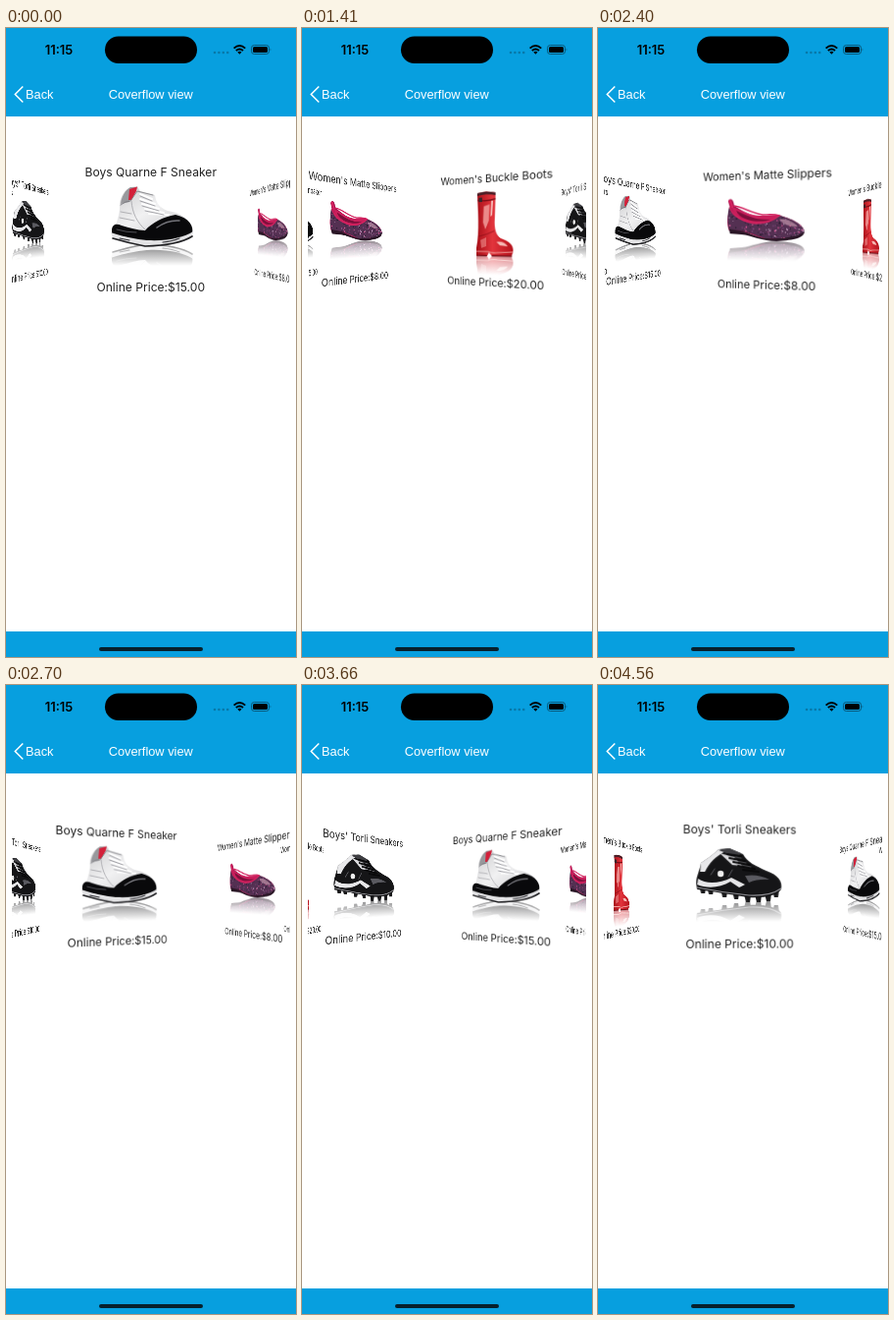
An HTML page that plays this animation: 296x640 px, repeating every 4660 ms.

```html
<!DOCTYPE html>
<html lang="en">
<head>
<meta charset="utf-8">
<title>Coverflow view</title>
<style>
html, body { margin: 0; width: 100%; height: 100%; overflow: hidden; background: #fff; }
#stage { position: absolute; left: 0; top: 0; width: 296px; height: 640px; overflow: hidden; background: #fff; }
#stage svg { position: absolute; left: 0; top: 0; }
#view { position: absolute; left: 6px; top: 90px; width: 284px; height: 524px; overflow: hidden; }
#view svg { left: -6px; top: -90px; transform-origin: 147.75px 213px; }
.label { font: 12.1px Inter, sans-serif; fill: #222; text-anchor: middle; }
.nav { font: 12.8px "Liberation Sans", sans-serif; fill: #fff; }
.clock { font: 600 13px Inter, sans-serif; text-anchor: middle; }
</style>
</head>
<body>
<div id="stage">
  <svg width="296" height="640" viewBox="0 0 296 640">
    <defs>
      <linearGradient id="fade" gradientUnits="userSpaceOnUse" x1="0" y1="217" x2="0" y2="238">
        <stop offset="0" stop-color="#fff" stop-opacity=".5"/>
        <stop offset="1" stop-color="#fff" stop-opacity="0"/>
      </linearGradient>
      <mask id="mirror" maskUnits="userSpaceOnUse" x="90" y="205" width="116" height="45">
        <rect x="90" y="205" width="116" height="45" fill="url(#fade)"/>
      </mask>
      <linearGradient id="leather" x1="0" y1="0" x2="1" y2="1">
        <stop offset="0" stop-color="#c9c9cb"/>
        <stop offset=".45" stop-color="#f1f1f2"/>
        <stop offset="1" stop-color="#c4c4c7"/>
      </linearGradient>
      <linearGradient id="rubber" x1="0" y1="0" x2="1" y2="0">
        <stop offset="0" stop-color="#a80f18"/>
        <stop offset=".45" stop-color="#e2343c"/>
        <stop offset="1" stop-color="#b5121c"/>
      </linearGradient>
      <clipPath id="vamp">
        <path d="M108 180C111 190 122 196 136 198C150 199 158 194 163 190C174 193 188 199 189 207C188 214 166 215 148 214C138 211 130 207 121 206L108 205C106 198 106 188 108 180Z"/>
      </clipPath>
    </defs>
    <rect width="296" height="90" fill="#079fdf"/>
    <rect y="614" width="296" height="26" fill="#079fdf"/>
    <rect x="95" y="630" width="106" height="4" rx="2" fill="#07202c"/>
    <rect x="101" y="8.5" width="94" height="27.5" rx="13.7"/>
    <text class="clock" x="54" y="26.7">11:15</text>
    <g fill="#0878a8">
      <circle cx="213" cy="25" r="1.3"/><circle cx="217.4" cy="25" r="1.3"/>
      <circle cx="221.8" cy="25" r="1.3"/><circle cx="226.2" cy="25" r="1.3"/>
    </g>
    <g fill="none" stroke="#000" stroke-width="1.9">
      <path d="M232.6 20.6Q238.4 15.4 244.2 20.6M234.8 23Q238.4 19.9 242 23"/>
    </g>
    <path d="M236.3 24.6Q238.4 22.9 240.5 24.6L238.4 26.8Z"/>
    <rect x="250.5" y="17.5" width="18" height="9" rx="2.8" fill="none" stroke="#07587a"/>
    <rect x="252" y="19" width="15" height="6" rx="1.6"/>
    <path d="M269.7 20.5Q271.2 22 269.7 23.5Z" fill="#07587a"/>
    <path d="M17.3 59.5L9.3 67.5L17.3 75.5" fill="none" stroke="#fff" stroke-width="1.5"/>
    <text class="nav" x="20" y="72">Back</text>
    <text class="nav" x="147.75" y="72" text-anchor="middle">Coverflow view</text>
  </svg>
  <div id="view"></div>
</div>
<script>
const LOOP = 4660, WIDTH = 230, DEPTH = 376, TILT = 0.9, SPACING = 0.25;

// small seeded generator for the glitter
let seed = 7;
const rand = () => (seed = seed * 16807 % 2147483647) / 2147483647;

function glitter(count) {
  const tones = ['#e85a9c', '#241a2c', '#8a4c86', '#c9a3c4', '#31203a'];
  let s = '';
  for (let i = 0; i < count; i++) {
    const x = (106 + rand() * 84).toFixed(1), y = (182 + rand() * 33).toFixed(1);
    s += `<circle cx="${x}" cy="${y}" r="${(0.4 + rand() * 0.5).toFixed(2)}" fill="${tones[i % 5]}"/>`;
  }
  return s;
}

const path = (d, fill) => `<path d="${d}" fill="${fill}"/>`;
const line = (d, color, w) => `<path d="${d}" fill="none" stroke="${color}" stroke-width="${w}" stroke-linecap="round"/>`;

const hightop =
  path('M111 207C112 197 117 190 116 179C117 171 121 165 127 162L134 161L137 166L152 170C153 178 157 183 165 186C178 188 188 194 190 205L150 214Z', 'url(#leather)') +
  path('M117 179C118 171 122 165 127 162L133 162L128 169L126 177Z', '#98989c') +
  path('M126 164L134 161.5L133 166L128 175L125 175Z', '#d3203a') +
  line('M117 180Q122 176 127 176L134 166L150 170', '#77777c', 0.8) +
  line('M128 176C129 189 134 198 142 205M117 187L128 189M116 193L131 196', '#a2a2a7', 0.8) +
  line('M137 169L149 174M137 174L152 179M139 179L156 184M142 184L161 188M146 189L166 190', '#fff', 2) +
  line('M137 171L149 176M137 176L152 181M139 181L156 186M142 186L161 190', '#85858b', 0.7) +
  path('M108 205C109 199 113 199 118 201C126 203 134 206 142 206C149 198 161 192 173 190C187 193 192 202 190 209C180 217 160 219 141 218C125 216 112 213 108 210Z', '#09090b') +
  line('M154 203Q165 195 177 196', '#74747a', 1.5) +
  line('M113 205Q123 208 133 208', '#4f4f55', 1) +
  path('M107 208C118 212 138 216 145 216C165 217 182 213 191 207L190 212C180 218 160 222 142 222C126 220 113 217 109 214Z', '#e3e3e5') +
  line('M109 214Q126 219 142 222Q176 221 190 212', '#202023', 1.7) +
  line('M116 214L126 216M160 218Q170 217 177 214', '#35353a', 1.2);

const slipper =
  path('M107 174C108 170 112 171 113 175L114 179C124 185 134 191 143 191L163 190C175 193 188 199 189 207C188 213 166 216 148 215C137 212 131 208 121 207L108 206C105 199 106 188 109 181Z', '#a71550') +
  path('M111 180C122 184 132 190 143 190L163 189C158 197 145 200 133 198C120 196 112 189 111 180Z', '#c91e5b') +
  path('M116 184C126 189 137 195 154 194C143 198 120 196 116 184Z', '#7b0f3b') +
  path('M108 180C111 190 122 196 136 198C150 199 158 194 163 190C174 193 188 199 189 207C188 214 166 215 148 214C138 211 130 207 121 206L108 205C106 198 106 188 108 180Z', '#543052') +
  `<g clip-path="url(#vamp)">${glitter(260)}</g>` +
  path('M163 194C171 193 179 198 182 202C174 202 166 199 163 194Z', '#d8a7bd99') +
  line('M109 181C112 190 123 196 136 198C150 199 158 194 163 190C157 188 151 189 145 189C132 187 123 180 114 179', '#d3225f', 1.5) +
  line('M109 173.5L111.5 180', '#d3225f', 3) +
  path('M108 204L121 206C131 208 140 214 150 214C168 215 183 212 189 207C189 213 180 216 160 217C144 217 133 211 122 210L109 209Z', '#2a1626');

const boot =
  path('M129 163Q140 160 151 163L150 192C149 204 152 211 157 214C166 217 172 221 171 229L169 234L147 234L143 230L141 234L128 234L128 225C132 206 130 184 129 163Z', 'url(#rubber)') +
  path('M129 163Q140 160 151 163L151 166Q140 163 129 166Z', '#4b2028') +
  line('M130 171Q140 173 150.5 170', '#7d0d16', 1.4) +
  '<rect x="131" y="168" width="4" height="5" fill="#39242a"/>' +
  path('M137 178L144 176L143 194L139 204L136 196Z', '#f2a3a0cc') +
  path('M146 172L148 172L147 188L145 190Z', '#f7c6c2') +
  path('M152 218Q161 217 165 223L156 222Z', '#f5b7b3') +
  path('M133 216L140 213L140 223L134 225Z', '#ee8e8c99') +
  line('M131 212Q141 210 149 206', '#8e0e18', 0.8) +
  line('M128.5 229L142 229Q147 231 153 230L170.5 229', '#f0a09c', 1.2) +
  line('M129 233.5L140 233.5M147 233.5L169 233.5', '#7d0d16', 1.3);

const stud = (x, y) => path(`M${x} ${y}l7 1l-1 7l-4 0z`, '#19191b');
const cleat =
  [[106, 204], [114, 205], [128, 208], [140, 210], [152, 213], [163, 213], [173, 212], [181, 208]].map(s => stud(...s)).join('') +
  path('M103 202C103 194 107 188 108 181C114 177 121 172 126 167L137 166L151 172C155 180 164 184 175 189C187 193 192 200 190 208C187 214 172 217 157 216C137 213 119 210 104 208Z', '#151517') +
  path('M108 181C114 177 121 172 126 167L133 169C123 174 116 181 112 190L107 190Z', '#e8e8ea') +
  path('M126 168L137 166L149 171L145 175Z', '#3e3e42') +
  path('M127 171L142 175L150 184L140 183Z', '#dadadd') +
  line('M135 172L149 174M137 176L153 179M141 180L158 183M146 184L163 187M151 188L167 190', '#09090a', 2) +
  line('M136 174L149 176M139 178L154 181M144 182L159 185', '#77777d', 0.6) +
  path('M105 197C113 203 127 202 139 196L153 203L147 206L138 200C127 207 113 207 104 203Z', '#e6e6e8') +
  path('M153 194Q167 192 178 198Q166 197 157 201Z', '#5a5a60') +
  '<circle cx="128" cy="192" r="3.2" fill="#eee"/>' +
  line('M104 206C119 209 137 212 157 214Q179 215 190 207', '#8d8d92', 1.1) +
  line('M122 187L118 193M140 188L136 195', '#66666c', 0.8);

const items = [
  { title: 'Boys Quarne F Sneaker', price: 15, art: hightop, ground: 221 },
  { title: "Women's Matte Slippers", price: 8, art: slipper, ground: 217 },
  { title: "Women's Buckle Boots", price: 20, art: boot, ground: 234 },
  { title: "Boys' Torli Sneakers", price: 10, art: cleat, ground: 220 }
];

// the fading mask is built for a ground line at 217 and moved to each shoe's own
const view = document.getElementById('view');
view.innerHTML = items.map((it, i) => `
  <svg width="296" height="640" viewBox="0 0 296 640">
    <g transform="translate(0 ${it.ground - 217})"><g mask="url(#mirror)">
      <use href="#art${i}" transform="matrix(1 0 0 -1 0 ${it.ground + 217})"/>
    </g></g>
    <g id="art${i}">${it.art}</g>
    <text class="label" x="147.75" y="150.6">${it.title}</text>
    <text class="label" x="147.75" y="268.2">Online Price:$${it.price}.00</text>
  </svg>`).join('');
const cards = [...view.children];

// decelerating flings: the gap to the resting place shrinks to zero at the end time
const flings = [
  { start: 870, end: 1810, to: 2, gap: 1.88, pow: 2.07 },
  { start: 2180, end: 3000, to: 0, gap: -1.59, pow: 2 },
  { start: 3660, end: 4620, to: -5, gap: -4.6, pow: 2 }
];

// the screen refreshes only at these moments
const ticks = [0, 870, 990, 1100, 1200, 1310, 1410, 1510, 1610, 1710, 1810,
  2180, 2290, 2400, 2500, 2600, 2700, 2800, 2900, 3000,
  3660, 3780, 3890, 4010, 4130, 4230, 4340, 4450, 4560];

function position(t) {
  const f = flings.filter(f => f.start <= t).pop();
  if (!f) return 0;
  const rest = Math.max(0, (f.end - t) / (f.end - f.start));
  return f.to - f.gap * rest ** f.pow;
}

function place(card, o) {
  const c = Math.max(-1, Math.min(1, o));
  const x = (c * 0.5 * TILT + o * SPACING) * WIDTH;
  const z = -Math.abs(c) * WIDTH / 2;
  card.style.transform = `perspective(${DEPTH}px) translate3d(${x}px,0,${z}px) rotateY(${-c * 90 * TILT}deg)`;
  card.style.zIndex = Math.round(100 - Math.abs(o) * 40);
}

function draw(t) {
  const p = position(ticks.filter(k => k <= t).pop());
  const n = cards.length;
  cards.forEach((card, i) => {
    const o = (((i - p + n / 2) % n) + n) % n - n / 2;
    place(card, o);
  });
}

const begin = performance.now();
function loop() {
  draw((performance.now() - begin) % LOOP);
  requestAnimationFrame(loop);
}
loop();
</script>
</body>
</html>
```
